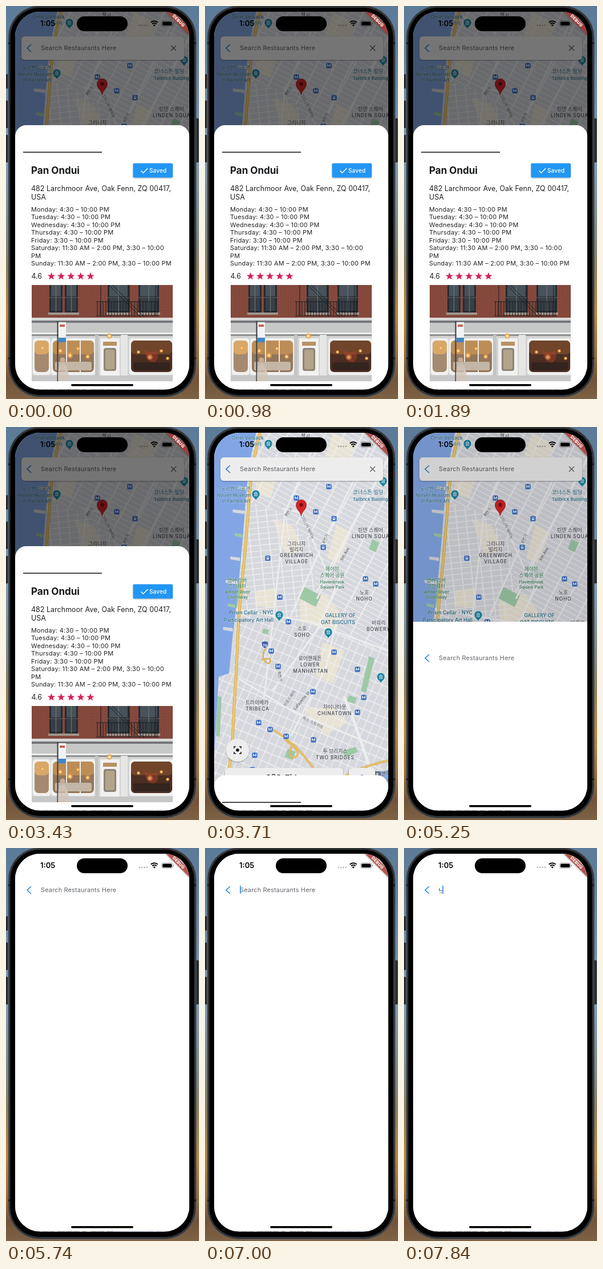
An HTML page that plays this animation: 338x686 px, repeating every 8000 ms.

```html
<!DOCTYPE html>
<html lang="en">
<head>
<meta charset="utf-8">
<title>Restaurant finder</title>
<style>
html, body { margin: 0; height: 100%; overflow: hidden; background: #000; }
svg { display: block; width: 100vw; height: 100vh; }
text { font-family: Inter, "Noto Sans CJK KR", "Noto Sans CJK", sans-serif; white-space: pre; }
.halo text { font-weight: 500; paint-order: stroke; stroke: #fff; stroke-opacity: .5; stroke-width: 1.2px; stroke-linejoin: round; }
</style>
</head>
<body>
<svg id="stage" viewBox="0 0 338 686" xmlns="http://www.w3.org/2000/svg"></svg>
<script>
const rect = (x, y, w, h, fill, r = 0, more = '') =>
  `<rect x="${x}" y="${y}" width="${w}" height="${h}" rx="${r}" fill="${fill}" ${more}/>`;
const circle = (x, y, r, fill, more = '') =>
  `<circle cx="${x}" cy="${y}" r="${r}" fill="${fill}" ${more}/>`;
const line = (d, color, w = 1, more = '') =>
  `<path d="${d}" fill="none" stroke="${color}" stroke-width="${w}" ${more}/>`;
const area = (d, fill, more = '') => `<path d="${d}" fill="${fill}" ${more}/>`;
const text = (x, y, s, size, fill = '#222', more = '') =>
  `<text x="${x}" y="${y}" font-size="${size}" fill="${fill}" ${more}>${s}</text>`;
const MID = 'text-anchor="middle"', END = 'text-anchor="end"', CAP = MID + ' letter-spacing=".85"';
const ROUND = 'stroke-linecap="round" stroke-linejoin="round"';

// ---- map ----
function grid(id, cx, cy, angle, stepX, stepY, wX, wY) {
  let a = '', b = '';
  for (let x = -360; x <= 360; x += stepX) a += `M${x} -400V400`;
  for (let y = -396; y <= 400; y += stepY) b += `M-400 ${y}H400`;
  return `<g clip-path="url(#${id})"><g transform="translate(${cx} ${cy}) rotate(${angle})">` +
    line(a, '#fff', wX) + line(b, '#fff', wY) + '</g></g>';
}

const metro = ([x, y]) => rect(x - 4.5, y - 4.5, 9, 9, '#2b6bd0', 1.6) +
  line(`M${x - 2.3} ${y + 2.5}V${y - 2.3}L${x} ${y + 1}L${x + 2.3} ${y - 2.3}V${y + 2.5}`, '#fff', 1.1);
const bus = ([x, y]) => rect(x - 4.5, y - 4.5, 9, 9, '#2b6bd0', 1.6) +
  rect(x - 2.3, y - 3, 4.6, 5, '#fff', 1) + rect(x - 1.5, y - 2, 3, 1.7, '#2b6bd0') +
  line(`M${x - 1.4} ${y + 2}v1.2M${x + 1.4} ${y + 2}v1.2`, '#fff', 1);
const poi = ([x, y]) =>
  area(`M${x} ${y + 11}C${x - 2} ${y + 7} ${x - 7} ${y + 5} ${x - 7} ${y}a7 7 0 0 1 14 0C${x + 7} ${y + 5} ${x + 2} ${y + 7} ${x} ${y + 11}Z`,
    '#1d8fae', 'stroke="#fff" stroke-width=".7"') +
  line(`M${x - 3.2} ${y - 1}L${x} ${y - 3.6}L${x + 3.2} ${y - 1}ZM${x - 2} ${y}v2.4M${x} ${y}v2.4M${x + 2} ${y}v2.4M${x - 3.2} ${y + 3}h6.4`, '#fff', .9);

const turned = (x, y, deg, s, size = 7) =>
  text(0, 0, s, size, '#5c6168', `${MID} transform="translate(${x} ${y}) rotate(${deg})"`);

function map() {
  const highway = 'M97 8C88 40 83 70 80 98S75 160 72 195S66 260 62 300S58 350 56 400S52 460 50 510S45 580 40 610S32 640 26 652';
  const fdr = 'M324 582C290 588 258 600 228 620S170 655 140 672';
  const bridge = 'M118 528C134 536 142 546 154 554S196 604 246 668';
  const village = 'M73 130L140 150L186 205L196 300L182 336L55 322Z';
  const south = 'M55 322L182 342L330 396V680H10V435L50 420Z';
  let s = `<clipPath id="north"><path d="M70 0H330V400L182 342L196 300L186 205L140 150L73 130Z"/></clipPath>
    <clipPath id="village"><path d="${village}"/></clipPath><clipPath id="south"><path d="${south}"/></clipPath>`;
  s += rect(16, 10, 305, 659, '#e6e8ef');
  // commercial blocks
  for (const d of ['M95 60l34 15l-14 50l-28 -10Z', 'M225 10l40 21l-28 50l-32 -16Z', 'M118 160l36 13l18 42l-30 10Z',
    'M165 285l48 8l26 34l-10 32l-62 -20Z', 'M90 285l34 -4l-4 34l-32 -2Z', 'M230 170l26 14l-22 54l-20 -9Z',
    'M206 376l38 14l-20 58l-30 -13Z', 'M172 492l52 -3l26 26l-40 24Z'])
    s += area(d, '#fbf4e4');
  s += grid('north', 250, 150, 28, 29, 8.7, 2.2, 1.3) + grid('village', 120, 240, -6, 17, 10, 1.7, 1.3) +
    grid('south', 170, 470, 23, 13, 17, 1.4, 1.6);
  // parks
  for (const d of ['M174 279l29 15l-9 20l-29 -15Z', 'M293 196l13 6l-7 17l-12 -6Z', 'M287 400l10 4l-15 60l-9 -3Z',
    'M58 268l6 2l-8 46l-7 -2Z', 'M145 562l14 5l-6 14l-14 -5Z', 'M252 468l14 5l-4 10l-14 -4Z',
    'M102 352l10 2l-2 8l-10 -2Z', 'M240 566l24 -8l4 9l-22 9Z', 'M22 470l7 1l-3 70l-7 -2Z'])
    s += area(d, '#a9d8b4');
  // rivers and piers
  s += area('M10 0H92C82 40 77 70 74 98S69 160 66 195S60 260 56 300S50 350 47 380L42 430L24 436L18 540L14 610L10 640Z', '#8cb3f6');
  s += area('M326 598C292 603 266 614 238 633S196 660 184 674H326Z', '#8cb3f6');
  for (let i = 0; i < 8; i++) {
    const y = 64 + i * 41, x = 78 - i * 4.2;
    s += area(`M${x} ${y}l-${13 + i % 3 * 4} -2v5l${13 + i % 3 * 4} 3Z`, i % 3 ? '#e6e8ef' : '#a9d8b4');
  }
  // main roads
  s += line('M196 300L260 170L330 40M150 330L208 200L262 90L300 10M104 470L140 150L196 20', '#fff', 2.8) +
    line('M55 318L182 340L330 394M118 460L200 350L236 262M150 540L212 420L232 330', '#fff', 3) +
    line('M243 470C262 512 280 570 304 640', '#fff', 5) + line('M136 142L168 150L196 214L212 250', '#fff', 2.6) +
    line('M60 440L160 500L324 566', '#fff', 3);
  for (const [d, w] of [[highway, 5], [fdr, 4], [bridge, 3.6],
    ['M107 386C100 394 100 404 106 410S117 410 113 404L100 406', 2.4],
    ['M142 548C160 560 168 570 158 576S144 564 154 556M262 600L324 646M284 600L300 668', 3]])
    s += line(d, '#e2a93f', w, ROUND) + line(d, '#fbd978', w - 1.4, ROUND);
  // stations
  s += [[217, 104], [160, 124], [194, 148], [281, 265], [299, 274], [131, 297], [146, 340], [116, 391], [128, 418], [226, 393],
    [267, 423], [278, 472], [267, 498], [189, 462], [94, 516], [114, 528], [142, 540], [190, 546], [87, 573], [83, 598]].map(metro).join('');
  s += [[226, 160], [207, 210], [110, 229]].map(bus).join('');
  s += [[89, 117], [312, 94], [130, 328], [216, 358], [308, 436], [111, 29], [280, 656]].map(poi).join('');
  s += circle(230, 634, 7, '#75808c') + line('M226 636v-4h8v4', '#fff', 1.2);
  s += area('M99 375q6 -3 12 0q1 9 -6 12q-7 -3 -6 -12Z', '#4a68b8', 'stroke="#fff"') +
    text(105, 384, '78', 6.5, '#fff', MID + ' font-weight="700"');
  s += rect(294, 601, 14, 14, '#6f7c90', 3) + text(301, 612, '4', 10, '#fff', MID + ' font-weight="600"');
  // labels
  const teal = '#2b7592', grey = '#474b52', green = '#38865a';
  s += '<g class="halo">';
  s += text(103, 22, 'Orrin Velsack', 8.8, teal, END) + text(99, 33, '갤러리', 7.5, teal, END);
  s += text(79, 111, '노르벤 미술관', 8.8, teal, END) + text(80, 122, 'Norvell Museum', 7.6, teal, END) +
    text(79, 132, 'of Painted Art', 7.6, teal, END);
  s += text(259, 117, '코너스톤 빌딩', 9.2, teal) + text(259, 129, 'Tallbrick Building', 7.5, teal);
  s += text(120, 327, 'Prism Cellar - NYC', 8.8, teal, END) + text(120, 340, 'Participatory Art Hall', 8.8, teal, END);
  s += text(237, 332, 'GALLERY OF', 8.7, teal, MID) + text(233, 344, 'OAT BISCUITS', 8.7, teal, MID);
  s += text(288, 660, '모린스', 9, teal);
  s += text(176, 19, '첼시', 8.8, grey, MID);
  s += text(160, 207, '그리니치', 8.8, grey, MID) + text(160, 217, '빌리지', 8.8, grey, MID) +
    text(160.5, 227, 'GREENWICH', 8.4, grey, CAP) + text(160.5, 238, 'VILLAGE', 8.4, grey, CAP);
  s += text(268, 183, '린덴 스퀘어', 9, grey) + text(257, 194, 'LINDEN SQUARE', 8.4, grey, 'letter-spacing=".85"');
  s += text(223, 251, '헤이븐', 8.8, green, MID) + text(223, 262, '스퀘어 공원', 8.8, green, MID) +
    text(223, 273, 'Havenbrook', 7.3, green, MID) + text(223, 282, 'Square Park', 7.3, green, MID);
  s += text(56, 271, '앰버 리버', 8.8, green, MID) + text(56, 281, '그린웨이', 8.8, green, MID) +
    text(57, 291, 'Amber River', 7.5, green, MID) + text(57, 300, 'Greenway', 7.5, green, MID);
  s += text(279, 292, '노호', 8.8, grey, MID) + text(279, 303, 'NOHO', 8.4, grey, CAP);
  s += text(170, 355, '소호', 8.8, grey, MID) + text(170, 366, 'SOHO', 8.4, grey, CAP);
  s += text(292, 345, '바워리', 8.8, grey) + text(283, 356, 'BOWERY', 8.4, grey, 'letter-spacing=".85"');
  s += text(184, 407, '로어맨해튼', 8.8, grey, MID) + text(184, 418, 'LOWER', 8.4, grey, CAP) + text(185, 429, 'MANHATTAN', 8.4, grey, CAP);
  s += text(91, 484, '트라이베카', 8.8, grey, MID) + text(92, 495, 'TRIBECA', 8.4, grey, CAP);
  s += text(227, 492, '차이나타운', 8.8, grey, MID) + text(227, 503, 'CHINATOWN', 8.4, grey, CAP);
  s += text(228, 569, '투 브리지스', 8.8, grey, MID) + text(228, 580, 'TWO BRIDGES', 8.4, grey, CAP);
  s += text(95, 636, 'DISTRICT', 8.4, grey, CAP);
  s += text(194, 633, '쿼로 다리', 8, grey, MID) + text(194, 643, 'Quarrow Bridge', 7.6, grey, MID);
  s += text(309, 608, '맨해튼', 8.5, grey) + text(309, 620, '다리', 8.5, grey);
  s += turned(148, 150, -50, '8번가') + turned(177, 175, 64, '그리니치 애비뉴') + turned(213, 196, -62, '6번가') +
    turned(247, 223, -60, '5th Ave') + turned(150, 475, -56, '브로드웨이') + turned(171, 479, -50, 'Lafayette St') +
    turned(188, 518, 27, '워스 스트리트') + turned(129, 436, 80, '6번가') + turned(258, 636, 25, '이스트 강');
  s += '</g>';
  s += area('M168.5 155C167 147 159.500 144 159.500 136a9 9 0 0 1 18 0C177.500 144 170 147 168.500 155Z', '#e5272c', 'stroke="#a91c20" stroke-width=".8"') +
    circle(168.5, 136, 3.2, '#7d1014');
  return s + circle(27, 657, 5, '#4285f4');
}

// ---- screens ----
const back = line('M44 67L37 73.500L44 80', '#2f86d8', 1.7);
const hint = () => text(61, 76.7, 'Search Restaurants Here', 10.9, '#62666b', 'letter-spacing=".19"');

function home() {
  const card = (x, y, w, h) => rect(x, y, w, h, '#fff', 6, 'filter="url(#shadow)"');
  let s = map() + card(27, 53, 285, 41) + back + hint() + line('M289 69l9 9m0 -9l-9 9', '#5a5d61', 1.2);
  s += card(35, 595, 207, 35) + card(252, 595, 46, 35) + circle(57, 564, 20, '#fff', 'filter="url(#shadow)"');
  s += line('M51 561v-3h3M60 558h3v3M63 567v3h-3M54 570h-3v-3', '#111', 1.5) + circle(57, 564, 2.8, '#111');
  for (const [x, y] of [[111, 610], [129, 610], [120, 609]])
    s += circle(x, y, 2.7, '#fff', 'stroke="#111" stroke-width="1.1"') +
      area(`M${x - 5} ${y + 9}v-2q0 -3 5 -3q5 0 5 3v2Z`, '#fff', 'stroke="#111" stroke-width="1.1"');
  s += text(140, 617.3, 'Zidu', 13.2, '#111', 'font-weight="700"');
  return s + text(275, 617.3, '?', 13, '#2f86d8', MID + ' font-weight="500"');
}

function photo() {
  let s = `<clipPath id="shot"><rect x="45" y="487" width="247" height="168"/></clipPath>
    <pattern id="brick" width="9" height="5" patternUnits="userSpaceOnUse">${rect(0, 0, 9, 5, '#8f4f41')}
    ${line('M0 .5H9M0 3H9M2 .5V3M6.500 3V5.500', '#6b372d', .6)}</pattern><g clip-path="url(#shot)">`;
  s += rect(45, 487, 247, 168, '#d2d3d2') + rect(45, 487, 247, 60, 'url(#brick)');
  for (const [x, w] of [[76, 23], [103, 23], [178, 38], [232, 36]])
    s += rect(x, 485, w, 50, '#262b30') + rect(x + 3, 487, w - 6, 20, '#47525a') + rect(x + 3, 510, w - 6, 22, '#363f46') +
      line(`M${x + w / 2} 487V534M${x} 509h${w}`, '#6e7173', 1.2) + rect(x - 2, 535, w + 4, 4, '#a0948b');
  // fire escape
  let bars = 'M158 516H268M158 541H268M180 487L236 543M186 487L242 543M166 487V541M216 487V541M262 487V541';
  for (let x = 160; x < 268; x += 5) bars += `M${x} 516V541`;
  s += line(bars, '#1b1e22', 1);
  s += rect(45, 544, 247, 5, '#d8d8d6') + rect(45, 549, 247, 4, '#74767a') + rect(45, 553, 247, 17, '#c6c7c7') +
    rect(45, 570, 247, 3, '#eeeeec') + rect(45, 573, 247, 3, '#8c8f90');
  const glass = (x, w, upper, lower) => rect(x - 3, 580, w + 6, 64, '#f0f0ee', 5) + rect(x, 584, w, 55, lower, 7) +
    rect(x, 584, w, 24, upper, 7);
  s += glass(50, 25, '#d9a768', '#a58a70') + glass(82, 72, '#bd8d57', '#94765a') + glass(219, 72, '#70452a', '#4a2e22');
  s += line('M106 584V639M130 584V639', '#ece8e0', 2) + rect(86, 621, 64, 15, '#c3b6a6', 3) + rect(223, 622, 64, 14, '#33241d', 3);
  s += rect(165, 580, 34, 75, '#f1f1ef') + rect(170, 586, 24, 7, '#b99263') + rect(171, 597, 22, 40, '#8b8477', 4) + rect(174, 600, 16, 34, '#b3a48a', 3);
  for (const [x, y, r] of [[64, 597, 3], [95, 602, 4], [112, 610, 5], [126, 598, 3], [143, 612, 4], [181, 576, 5], [232, 604, 3], [252, 613, 5], [272, 602, 3], [283, 615, 3]])
    s += circle(x, y, r, '#f2a03d', 'opacity=".7"') + circle(x, y, r / 2, '#ffe3a0');
  s += area('M242 600q10 8 22 2q6 12 -4 20q-14 2 -18 -22Z', '#b5432a', 'opacity=".45"');
  s += rect(201, 574, 12, 81, '#e6e6e4') + rect(156, 574, 6, 81, '#c3c4c4') + rect(45, 645, 247, 10, '#c6c7c6');
  s += rect(89.5, 550, 2, 105, '#3a3d40') + rect(92, 552, 13, 35, '#f1f3f4') + rect(92, 579, 13, 8, '#3f86c6') + rect(94, 556, 9, 4, '#c9635c');
  s += circle(99, 618, 4.5, '#c9ab95') + area('M91 655C90 634 93 624 99 624S111 634 109 655Z', '#cfc3b7', 'opacity=".8"');
  return s + '</g>';
}

function sheet() {
  let s = area('M16 670V227.400A19.400 19.400 0 0 1 35.400 208H301.600A19.400 19.400 0 0 1 321 227.400V670Z', '#fff') + line('M30 255.300H168', '#111', 1.5);
  s += text(44, 293, 'Pan Ondui', 17, '#16181a', 'font-weight="700"');
  s += rect(222.5, 274.5, 69.5, 25, '#2196f3', 2, 'filter="url(#shadow)"') + line('M236.500 287.500l3.800 3.800l8 -8', '#fff', 1.5) +
    text(251, 290.5, 'Saved', 10, '#fff', 'font-weight="500" letter-spacing=".15"');
  s += text(44, 323, '482 Larchmoor Ave, Oak Fenn, ZQ 00417,', 12.4, '#222', 'letter-spacing=".07"') + text(44, 338, 'USA', 12.4);
  ['Monday: 4:30 – 10:00 PM', 'Tuesday: 4:30 – 10:00 PM', 'Wednesday: 4:30 – 10:00 PM', 'Thursday: 4:30 – 10:00 PM',
    'Friday: 3:30 – 10:00 PM', 'Saturday: 11:30 AM – 2:00 PM, 3:30 – 10:00', 'PM', 'Sunday: 11:30 AM – 2:00 PM, 3:30 – 10:00 PM']
    .forEach((row, i) => s += text(44, 359 + i * 13.43, row, 10.9, '#222', 'letter-spacing=".25"'));
  s += text(44.5, 475.6, '4.6', 12.4);
  for (let i = 0; i < 5; i++) {
    let d = '';
    for (let k = 0; k < 10; k++) {
      const r = k % 2 ? 2.9 : 7, a = k * Math.PI / 5;
      d += (k ? 'L' : 'M') + (79.5 + i * 17.1 + r * Math.sin(a)).toFixed(2) + ' ' + (471.8 - r * Math.cos(a)).toFixed(2);
    }
    s += area(d + 'Z', '#d81f58');
  }
  return s + photo();
}

function statusBar() {
  let s = rect(124, 18, 89, 26, '#000', 13) + text(60, 35.4, '1:05', 13, '#000', 'font-weight="600"');
  for (let i = 0; i < 4; i++) s += circle(233.7 + i * 4.4, 33.8, 1.4, '#000', 'opacity=".28"');
  s += line('M253.800 28.600a8.700 8.700 0 0 1 12 0M256 31.300a5.500 5.500 0 0 1 7.600 0', '#000', 1.9) + area('M257.700 33.200q2.100 -1.700 4.200 0l-2.100 2.300Z', '#000');
  s += rect(272.5, 26, 19.5, 9.4, 'none', 3, 'stroke="#000" stroke-opacity=".4" stroke-width=".9"') + rect(274, 27.4, 16.5, 6.6, '#000', 1.8) +
    rect(293, 29.2, 1.2, 3, '#000', .6, 'opacity=".4"');
  s += rect(114, 660, 109, 3.5, '#000', 1.75);
  s += `<g transform="translate(302.500 25.500) rotate(45)">${rect(-40, -4.6, 80, 9.4, '#a8352f', 0, 'opacity=".84" filter="url(#shadow)"')}
    ${text(0, 2.7, 'DEBUG', 7.4, '#fff', MID + ' font-weight="800" letter-spacing=".3"')}</g>`;
  return s;
}

const stops = [[0, '#5c7b99'], [.1, '#5f7f9d'], [.4, '#7f9cb4'], [.58, '#7f8a84'], [.66, '#8a8160'], [.78, '#bb8540'], [.88, '#a06f3a'], [.95, '#73543a'], [1, '#7d6245']]
  .map(([o, c]) => `<stop offset="${o}" stop-color="${c}"/>`).join('');

function frame() {
  let s = rect(0, 0, 338, 686, 'url(#sky)');
  for (const [x, y, h] of [[-2, 119, 25], [-2, 165, 48], [-2, 225, 48], [332, 196, 77]]) s += rect(x, y, 5.5, h, '#25282b', 1.5);
  s += rect(4.2, -.5, 328.8, 683, '#2f3336', 55, 'stroke="#54595d"') + rect(7, 2.5, 323, 677, '#000', 52, 'stroke="#43474a" stroke-width=".8"');
  return s + line('M4 65h4M329 65h4M4 615h4M329 615h4', '#17191b', 3);
}

document.getElementById('stage').innerHTML = `<defs>
  <linearGradient id="sky" x2="0" y2="1">${stops}</linearGradient>
  <filter id="shadow" x="-20%" y="-40%" width="140%" height="190%"><feDropShadow dx="0" dy="1" stdDeviation="1.300" flood-opacity=".35"/></filter>
  <clipPath id="screen"><rect x="16" y="10" width="305" height="659.500" rx="44"/></clipPath></defs>
  ${frame()}<g clip-path="url(#screen)">${home()}
  ${rect(16, 10, 305, 660, '#000', 0, 'id="dim"')}
  <g id="sheet">${sheet()}</g>
  <g id="page">${rect(16, 10, 305, 660, '#fff')}${back}<g id="hint">${hint()}</g>
    <g id="typed">${text(59.6, 76.6, 'ㄴ', 10.9, '#333')}${line('M62 78.200h6', '#555', .7)}</g>
    ${rect(0, 65.5, 1.6, 14.5, '#2f8fe8', .8, 'id="caret"')}</g>
  ${statusBar()}</g>`;

// ---- timeline: time, dim, sheet y, page y, caret x, typed ----
const LOOP = 8000, OFF = 700;
const steps = [
  [0, .54, 0, OFF, 0, 0],
  [3570, .34, 170, OFF, 0, 0],
  [3710, .07, 400, OFF, 0, 0],
  [3850, 0, OFF, OFF, 0, 0],
  [5250, .18, OFF, 330, 0, 0],
  [5390, .3, OFF, 70, 0, 0],
  [5460, .3, OFF, 14, 0, 0],
  [5740, 0, OFF, 0, 0, 0],
  [7000, 0, OFF, 0, 61.2, 0],
  [7840, 0, OFF, 0, 67.4, 1],
];
const el = id => document.getElementById(id);
const show = (id, on) => el(id).setAttribute('visibility', on ? 'visible' : 'hidden');
const start = performance.now();
let current = null;

function draw(now) {
  const t = Math.max(0, now - start) % LOOP;
  const step = steps.findLast(s => s[0] <= t);
  if (step !== current) {
    current = step;
    const [, dim, sheetY, pageY, caret, typed] = step;
    el('dim').setAttribute('opacity', dim);
    el('sheet').setAttribute('transform', `translate(0 ${sheetY})`);
    el('page').setAttribute('transform', `translate(0 ${pageY})`);
    el('caret').setAttribute('x', caret);
    show('caret', caret > 0);
    show('hint', !typed);
    show('typed', typed);
  }
  requestAnimationFrame(draw);
}
draw(start);
</script>
</body>
</html>
```
